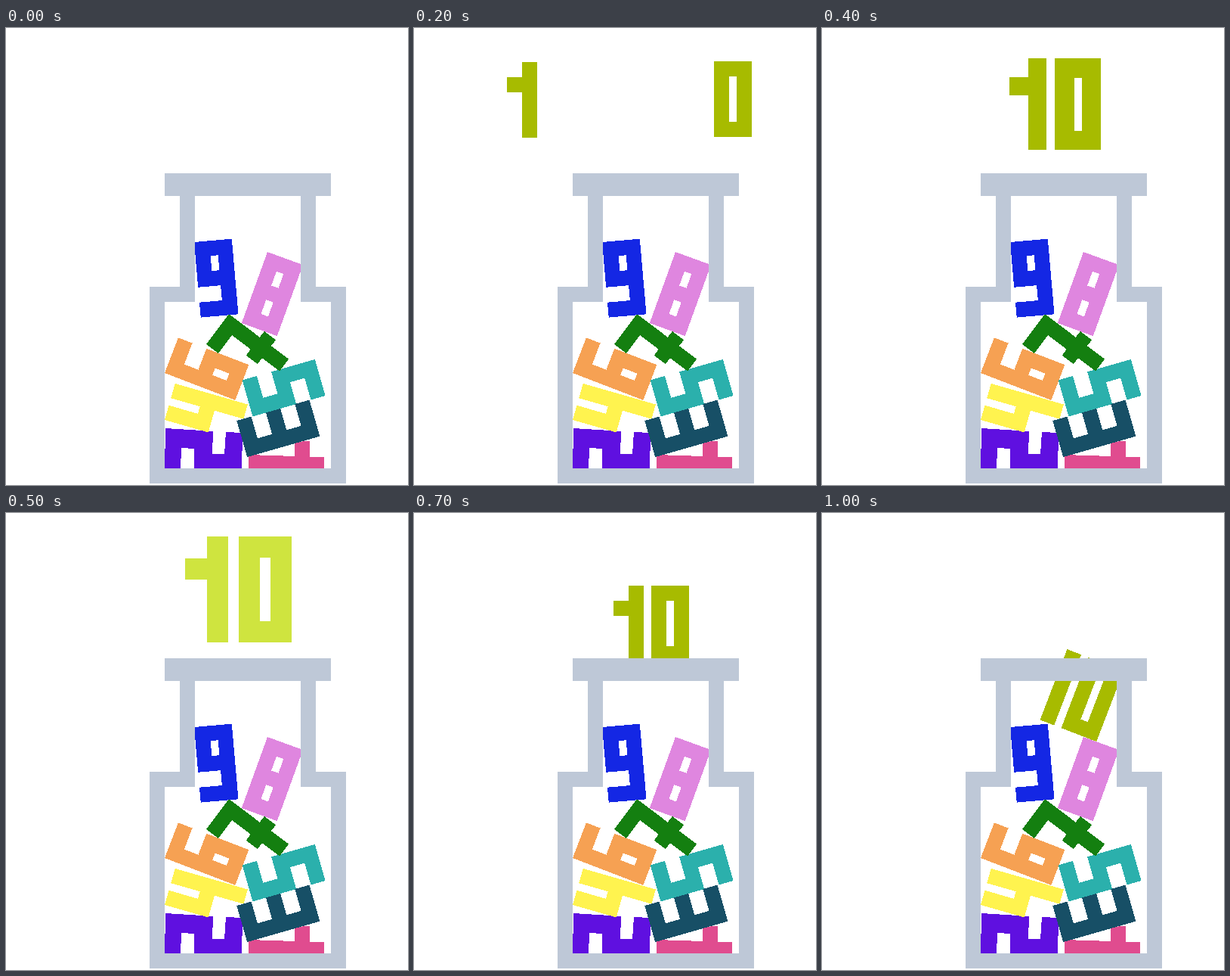
Recreate the animation shown at these times as an HTML page. Size 532 by 604 pixels, loop 1.1 s.

```html
<!DOCTYPE html>
<html lang="en">
<head>
<meta charset="utf-8">
<title>Number jar</title>
<style>
  html, body { margin: 0; width: 100%; height: 100%; overflow: hidden; background: #fff; }
  svg { display: block; width: 532px; height: 604px; }
</style>
</head>
<body>
<svg viewBox="0 0 532 604" shape-rendering="crispEdges" fill-rule="evenodd">
  <path fill="#e04c8f" d="M321 564L382 566V547L402 546V567H421V583H321Z"/>
  <path fill="#5f10e0" d="M211 529L274 533L273 563H289L291 534L313 535L312 583H249V556L232 555L231 583H210Z"/>
  <!-- digits on a 50 x 100 grid -->
  <path fill="#174f66" transform="translate(401.5 491.5) rotate(74)" d="M0 0H50V100H0V80H30V60H0V40H30V20H0Z"/>
  <path fill="#fff34f" transform="translate(210 518) rotate(-74)" d="M0 0H20V40H30V0H50V100H30V60H0Z"/>
  <path fill="#2bb0ac" transform="translate(326.5 513.5) rotate(-106)" d="M0 0H50V20H20V40H50V100H0V80H30V60H0Z"/>
  <path fill="#f6a153" transform="translate(210 456) rotate(-69)" d="M0 0H50V20H20V40H50V100H0ZM20 60H30V80H20Z"/>
  <path fill="#147f10" transform="translate(265 418) rotate(-53)" d="M0 0H50V51H60V70H50V99H30V70H20V51H30V20H0Z"/>
  <path fill="#df86df" transform="translate(346 296) rotate(20)" d="M0 0H50V100H0ZM20 20H30V40H20ZM20 60H30V80H20Z"/>
  <path fill="#1427e4" transform="translate(249 283) rotate(-5)" d="M0 0H50V100H0V80H30V60H0ZM20 20H30V40H20Z"/>
  <path id="ten"/>
  <path fill="none" stroke="#bec8d7" stroke-width="20" d="M240 222V352H200V592H440V352H400V222"/>
  <path fill="#bec8d7" d="M210 192H430V222H210Z"/>
</svg>
<script>
const STEP = 100, LOOP = 1100;
const OLIVE = '#a7bb00', LIME = '#cfe43f';
const ten = document.getElementById('ten');

const one = (x, y, h, t) =>
  `M${x} ${y + t}h${t}v${-t}h${t}v${h}h${-t}v${2 * t - h}h${-t}z`;
const zero = (x, y, w, h, t) =>
  `M${x} ${y}h${w}v${h}h${-w}zm${t} ${t}v${h - 2 * t}h${w - 2 * t}v${2 * t - h}z`;

// The two digits at normal size, each at its own place
const pair = (x1, y1, x0, y0) => one(x1, y1, 100, 20) + zero(x0, y0, 50, 100, 20);

function pose(step) {
  if (step < 1) return { d: '' };
  if (step < 3) return { d: pair(107 * step - 91, 45, 539 - 71 * step, 44) };
  if (step === 3) return { d: pair(264, 45, 314, 44) };
  if (step === 5) return { d: one(237, 31, 140, 28.5) + zero(308, 31, 70, 140, 28), fill: LIME };
  if (step < 7) return { d: one(248, 40, 121, 24.5) + zero(308, 40, 61, 121, 25.5) };
  if (step === 7) return { d: pair(264, 96, 314, 96) };
  const k = (step - 8) / 2;
  return {
    d: pair(264, 141, 314, 141),
    move: `translate(${20.5 * k} ${46.5 * k}) rotate(${21 * k} 314 191)`
  };
}

function draw(now) {
  const { d, fill = OLIVE, move = '' } = pose(Math.floor(now % LOOP / STEP));
  ten.setAttribute('d', d);
  ten.setAttribute('fill', fill);
  ten.setAttribute('transform', move);
}

const start = performance.now();
function tick() {
  draw(performance.now() - start);
  requestAnimationFrame(tick);
}
tick();
</script>
</body>
</html>
```
